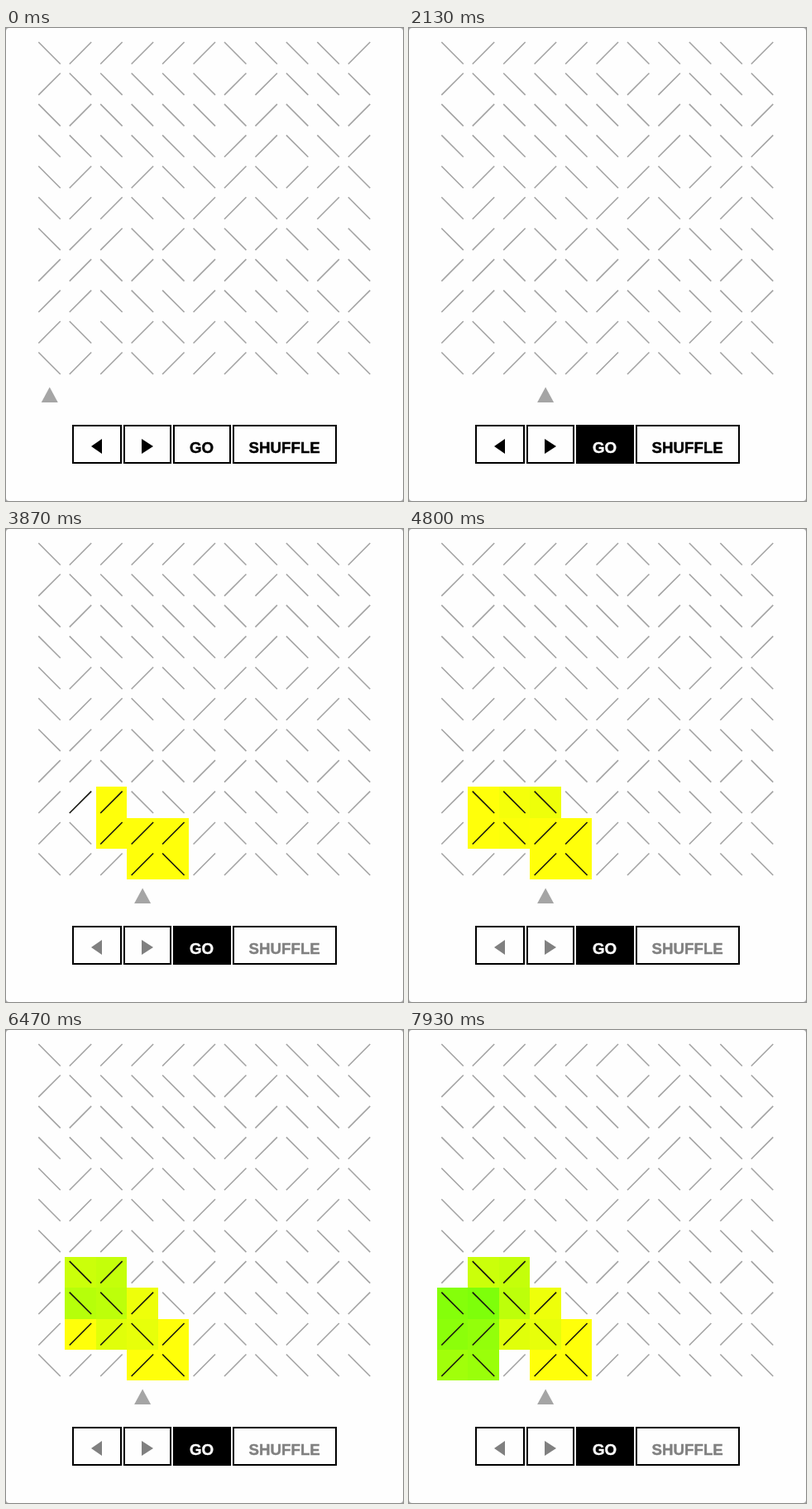
Animation, 480 px wide and 571 px high, one loop 8 s. Source, as an HTML page with a canvas:

```html
<!DOCTYPE html>
<html lang="en">
<head>
<meta charset="utf-8">
<title>Mirrors</title>
<style>
  html, body { margin: 0; width: 100%; height: 100%; overflow: hidden; background: #aaa; }
  canvas { display: block; }
</style>
</head>
<body>
<canvas width="480" height="571"></canvas>
<script>
const ctx = document.querySelector('canvas').getContext('2d');
const LOOP = 8000, CELL = 37.45, LEFT = 33.8, TOP = 11.5, INSET = 5.5;
const START = { col: 3, row: 10 };
const FIRST_STEP = 2233, STEP = 200, PAINT_DELAY = 67;
const MOVES = [1400, 1750, 2000];          // when the pointer hops one column right
const HOVER_NEXT = 870, HOVER_GO = 2130, RUN = 2200;

const mirrors = String.raw`
\/////\\\\/
/\\\\\//\\\
\/\\\\\/\\/
\\\\\\//\\/
\/\/\\/\//\
\//\\//\//\
\//\/\\/\\\
//\/\//\\/\
//\\\/\\\\/
/\\/\/\\//\
\//\///\\\\
`.trim().split('\n');

const paint = step => `rgb(${Math.round(255 - 7 * Math.max(0, step - 9.5))},255,10)`;

// Follow the beam: each mirror deflects it and flips once it has left.
function simulate(time) {
  const grid = mirrors.map(line => [...line].map(shape => ({ shape, lit: false, color: null })));
  let { col, row } = START, dx = 0, dy = -1;
  for (let step = 0; time >= FIRST_STEP + step * STEP; step++) {
    const cell = grid[row]?.[col];
    if (!cell) break;
    const age = time - FIRST_STEP - step * STEP;
    cell.lit = true;
    if (age >= PAINT_DELAY) cell.color = paint(step);
    if (age < STEP) break;
    if (step > 0) {                         // the beam starts out straight up
      const sign = cell.shape === '/' ? -1 : 1;
      [dx, dy] = [sign * dy, sign * dx];
      cell.shape = cell.shape === '/' ? '\\' : '/';
    }
    col += dx;
    row += dy;
  }
  return grid;
}

function polygon(color, ...points) {
  ctx.fillStyle = color;
  ctx.beginPath();
  points.forEach(([x, y]) => ctx.lineTo(x, y));
  ctx.fill();
}

function drawCell({ shape, lit, color }, col, row) {
  const x = LEFT + col * CELL, y = TOP + row * CELL;
  const near = INSET, far = CELL - INSET;
  if (color) {
    const left = Math.round(x), top = Math.round(y);
    ctx.fillStyle = color;
    ctx.fillRect(left, top, Math.round(x + CELL) - left, Math.round(y + CELL) - top);
  }
  const [from, to] = shape === '/' ? [far, near] : [near, far];
  ctx.strokeStyle = lit ? '#151510' : '#a3a3a3';
  ctx.lineWidth = 1.6;
  ctx.beginPath();
  ctx.moveTo(x + near, y + from);
  ctx.lineTo(x + far, y + to);
  ctx.stroke();
}

function drawButton(left, right, active, disabled, drawLabel) {
  ctx.fillStyle = '#000';
  ctx.fillRect(left, 479, right - left, 47);
  if (!active) {
    ctx.fillStyle = '#fefefe';
    ctx.fillRect(left + 2, 481, right - left - 4, 43);
  }
  drawLabel(active ? '#fefefe' : disabled ? '#808080' : '#000');
}

const label = (text, x) => color => {
  ctx.fillStyle = ctx.strokeStyle = color;
  ctx.lineWidth = 0.4;
  ctx.fillText(text, x, 512.5);
  ctx.strokeText(text, x, 512.5);
};
const pointer = (base, tip) => color =>
  polygon(color, [base, 496], [tip, 505], [base, 514]);

function draw(time) {
  ctx.clearRect(0, 0, 480, 571);
  ctx.fillStyle = '#fefefe';
  ctx.beginPath();
  ctx.roundRect(0, 0, 480, 571, 4);
  ctx.fill();

  const grid = simulate(time);
  grid.forEach((line, row) => line.forEach((cell, col) => drawCell(cell, col, row)));

  const x = 52.75 + CELL * MOVES.filter(t => time >= t).length;
  polygon('#a5a5a5', [x, 433.5], [x + 10, 452], [x - 10, 452]);

  const running = time >= RUN;
  ctx.font = 'bold 18.7px "Liberation Sans", Arial, sans-serif';
  ctx.textAlign = 'center';
  drawButton(80, 140, false, running, pointer(116, 103));
  drawButton(142, 200, time >= HOVER_NEXT && time < HOVER_GO - 60, running, pointer(164, 178));
  drawButton(202, 272, time >= HOVER_GO, false, label('GO', 236.5));
  drawButton(274, 400, false, running, label('SHUFFLE', 336.7));
}

function frame(now) {
  draw(now % LOOP);
  requestAnimationFrame(frame);
}
draw(0);
requestAnimationFrame(frame);
</script>
</body>
</html>
```
